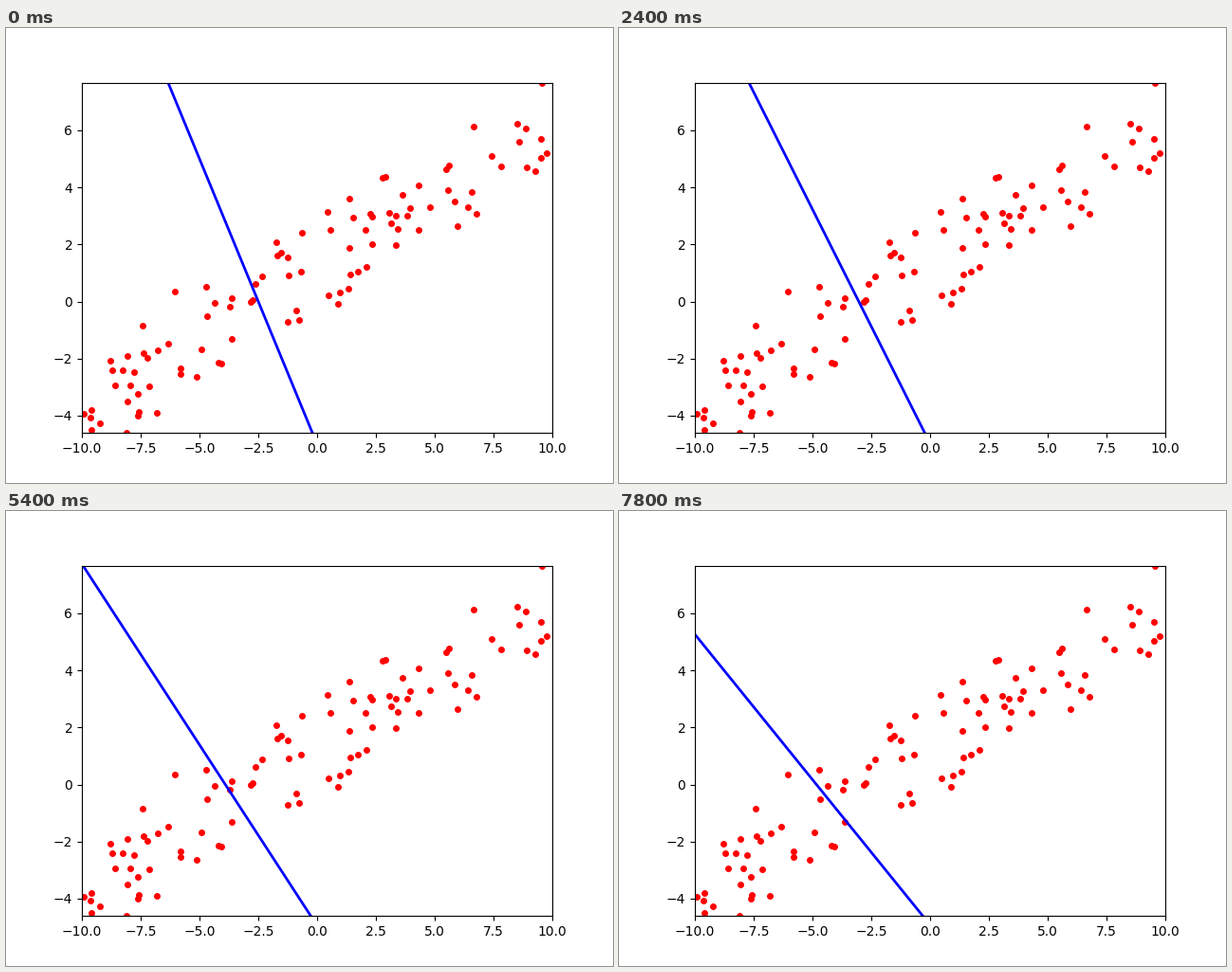
A matplotlib script for the animation above (8000 ms loop, 640 px wide and 480 px high).

```python
import numpy as np
import matplotlib.pyplot as plt
from matplotlib.animation import FuncAnimation

FRAMES = 40
INTERVAL = 200  # ms
RATE = 0.0004

# Noisy samples around y = 0.5 x + 1
np.random.seed(0)
x = np.random.rand(100) * 20 - 10
y = 0.5 * x + 1 + np.random.randn(100)


def descend(steps, slope=-2.0, bias=-5.0):
    """Fit a line by gradient descent, returning it after every step."""
    path = []
    for _ in range(steps):
        path.append((slope, bias))
        error = slope * x + bias - y
        slope -= RATE * np.mean(error * x)
        bias -= RATE * np.mean(error)
    return path


path = descend(FRAMES)
ends = np.array([-10.0, 10.0])

fig, ax = plt.subplots(figsize=(6.4, 4.8), dpi=100)
ax.set_xlim(*ends)
ax.set_ylim(y.min(), y.max())
ax.plot(x, y, "ro", markersize=4)
line, = ax.plot([], [], "b-", lw=2)


def update(frame):
    slope, bias = path[frame]
    line.set_data(ends, slope * ends + bias)
    return line,


anim = FuncAnimation(fig, update, frames=FRAMES, interval=INTERVAL,
                     repeat=True, repeat_delay=0)
plt.show()
```
